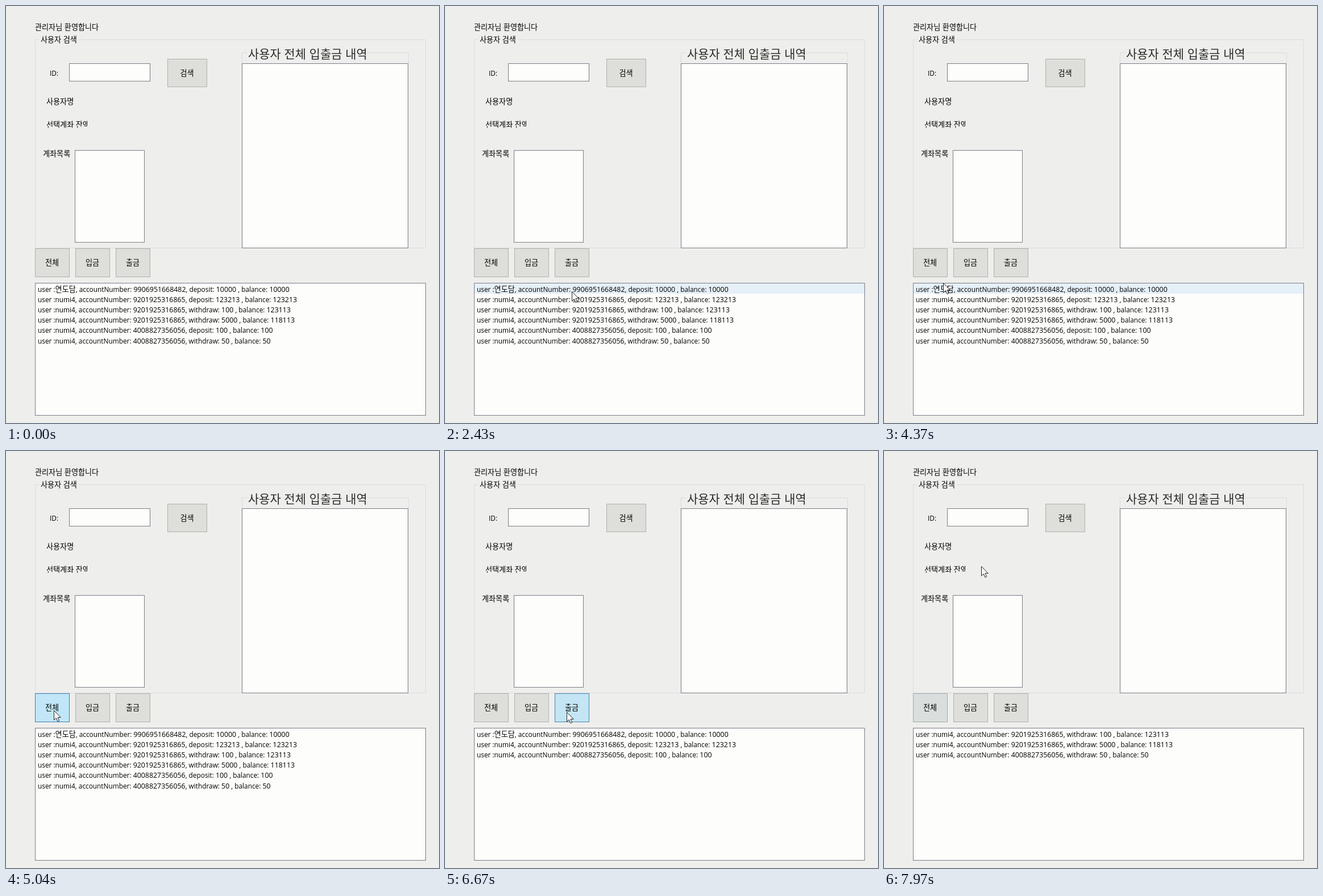
Recreate the animation shown at these times as an HTML page. Size 762 by 735 pixels, loop 8000 ms.

```html
<!DOCTYPE html>
<html lang="ko">
<head>
<meta charset="utf-8">
<title>관리자</title>
<style>
  html, body { margin: 0; width: 100%; height: 100%; overflow: hidden; background: #eeeeec; }
  svg { display: block; width: 762px; height: 735px; }
  text { font: 13.1px "Noto Sans CJK KR", sans-serif; fill: #000; white-space: pre; }
  .mid { text-anchor: middle; }
  .title { font-size: 20.9px; font-weight: 300; fill: #2a2a2a; }
  .row, .id { font: 11.83px "Open Sans", "Noto Sans CJK KR", sans-serif; }
  .num { font-size: 12.38px; }
  .han { font-size: 13.1px; }
  .group { fill: none; stroke: #dcdce2; }
  .box { fill: #fdfdfb; stroke: #7c7c88; }
  .btn { fill: #dededa; stroke: #b0b0ac; }
  .hot { fill: #c0e6f8; stroke: #3c7fb1; opacity: 0; }
</style>
</head>
<body>
<svg viewBox="0 0 762 735">
  <clipPath id="cut"><rect x="70" y="198" width="73" height="16.5"/></clipPath>
  <path class="group" d="M58 59.5H51.5V426.5H738.5V59.5H128"/>
  <path class="group" d="M424 82.5H415.5V102M636 82.5H708.5V102"/>
  <text x="51" y="41.5">관리자님 환영합니다</text>
  <text x="61" y="63.5">사용자 검색</text>
  <text class="title" x="426" y="91.5">사용자 전체 입출금 내역</text>
  <text class="id" x="77" y="122.5">ID:</text>
  <text x="71" y="173">사용자명</text>
  <text x="71" y="213.5" clip-path="url(#cut)">선택계좌 잔액</text>
  <text x="65" y="264.5">계좌목록</text>
  <rect class="box" x="111.5" y="101.5" width="142" height="31"/>
  <rect class="box" x="121.5" y="254.5" width="122" height="162"/>
  <rect class="box" x="415.5" y="101.5" width="292" height="325"/>
  <rect class="box" x="51.5" y="488.5" width="687" height="233"/>
  <rect id="glow" x="52" width="686" height="18.2" fill="#e5f0f9"/>
  <g id="buttons"></g>
  <g id="rows"></g>
  <path id="cursor" d="M.5.5V17.2L4.3 13.6 7 19.8 9.6 18.7 7 12.6H12.2Z" fill="#fff" stroke="#222" stroke-linejoin="round"/>
</svg>
<script>
const LOOP = 8000, TOP = 489, STEP = 18.2;
const $ = id => document.getElementById(id);

const log = [
  ['연도담', '9906951668482', 'deposit', 10000, 10000],
  ['numi4', '9201925316865', 'deposit', 123213, 123213],
  ['numi4', '9201925316865', 'withdraw', 100, 123113],
  ['numi4', '9201925316865', 'withdraw', 5000, 118113],
  ['numi4', '4008827356056', 'deposit', 100, 100],
  ['numi4', '4008827356056', 'withdraw', 50, 50]
];

// label, x, y, width, height
const buttons = [
  ['검색', 284, 93, 69, 49],
  ['전체', 51, 427, 60, 50],
  ['입금', 122, 427, 60, 50],
  ['출금', 193, 427, 60, 50]
];

// time, x, y of the pointer tip
const path = [
  [1640, 258, 496], [2430, 223, 503], [3000, 190, 520], [3700, 150, 532],
  [4100, 118, 512], [4370, 104, 488], [4800, 88, 462], [5040, 84, 457],
  [5200, 84, 457], [5480, 124, 452], [5770, 127, 458], [6240, 129, 458],
  [6560, 208, 456], [6670, 214, 460], [6970, 216, 461], [7170, 214, 461],
  [7480, 140, 458], [7660, 88, 452], [7790, 98, 426], [7970, 171, 203]
];

$('buttons').innerHTML = buttons.map(([label, x, y, w, h]) => {
  const frame = `x="${x + .5}" y="${y + .5}" width="${w}" height="${h}"`;
  return `<rect class="btn" ${frame}/><rect class="hot" ${frame}/>
    <text class="mid" x="${x + w / 2}" y="${y + h / 2 + 5}">${label}</text>`;
}).join('');
const hots = document.querySelectorAll('.hot');

function rowText([user, account, kind, sum, balance], i) {
  const line = `user :${user}, accountNumber: ${account}, ${kind}: ${sum} , balance: ${balance}`
    .replace(/\d{2,}/g, '<tspan class="num">$&</tspan>')
    .replace(/[가-힣]+/g, '<tspan class="han">$&</tspan>');
  return `<text class="row" x="56" y="${503.6 + i * STEP}">${line}</text>`;
}

function pointer(t) {
  if (t < path[0][0]) return null;
  const k = path.findIndex(p => p[0] > t);
  if (k < 0) return path[path.length - 1].slice(1);
  const [t0, x0, y0] = path[k - 1], [t1, x1, y1] = path[k];
  const u = (t - t0) / (t1 - t0), e = u * u * (3 - 2 * u);
  return [x0 + (x1 - x0) * e, y0 + (y1 - y0) * e];
}

const inside = (p, [, x, y, w, h]) =>
  p && p[0] >= x && p[0] <= x + w && p[1] >= y && p[1] <= y + h ? 1 : 0;

// share of the last 240 ms spent over a button, giving a linear fade
function heat(t, button) {
  let sum = 0;
  for (let i = 0; i < 16; i++) sum += inside(pointer(t - i * 15), button);
  return sum / 16;
}

let shown = null;
function draw(now) {
  const t = now % LOOP;
  const kind = t < 5870 ? '' : t < 6800 ? 'deposit' : 'withdraw';
  const list = log.filter(r => !kind || r[2] === kind);
  if (kind !== shown) {
    $('rows').innerHTML = list.map(rowText).join('');
    shown = kind;
  }
  const p = pointer(t);
  const cursor = $('cursor'), glow = $('glow');
  cursor.style.display = p ? '' : 'none';
  if (p) cursor.setAttribute('transform', `translate(${Math.round(p[0])} ${Math.round(p[1])})`);
  const row = p && p[1] >= TOP - 1.5 ? Math.max(0, Math.floor((p[1] - TOP) / STEP)) : -1;
  glow.style.display = row >= 0 && row < list.length ? '' : 'none';
  glow.setAttribute('y', TOP + Math.max(row, 0) * STEP);
  hots.forEach((el, i) => { el.style.opacity = heat(t, buttons[i]); });
}

const start = performance.now();
function tick() {
  draw(performance.now() - start);
  requestAnimationFrame(tick);
}
tick();
</script>
</body>
</html>
```
